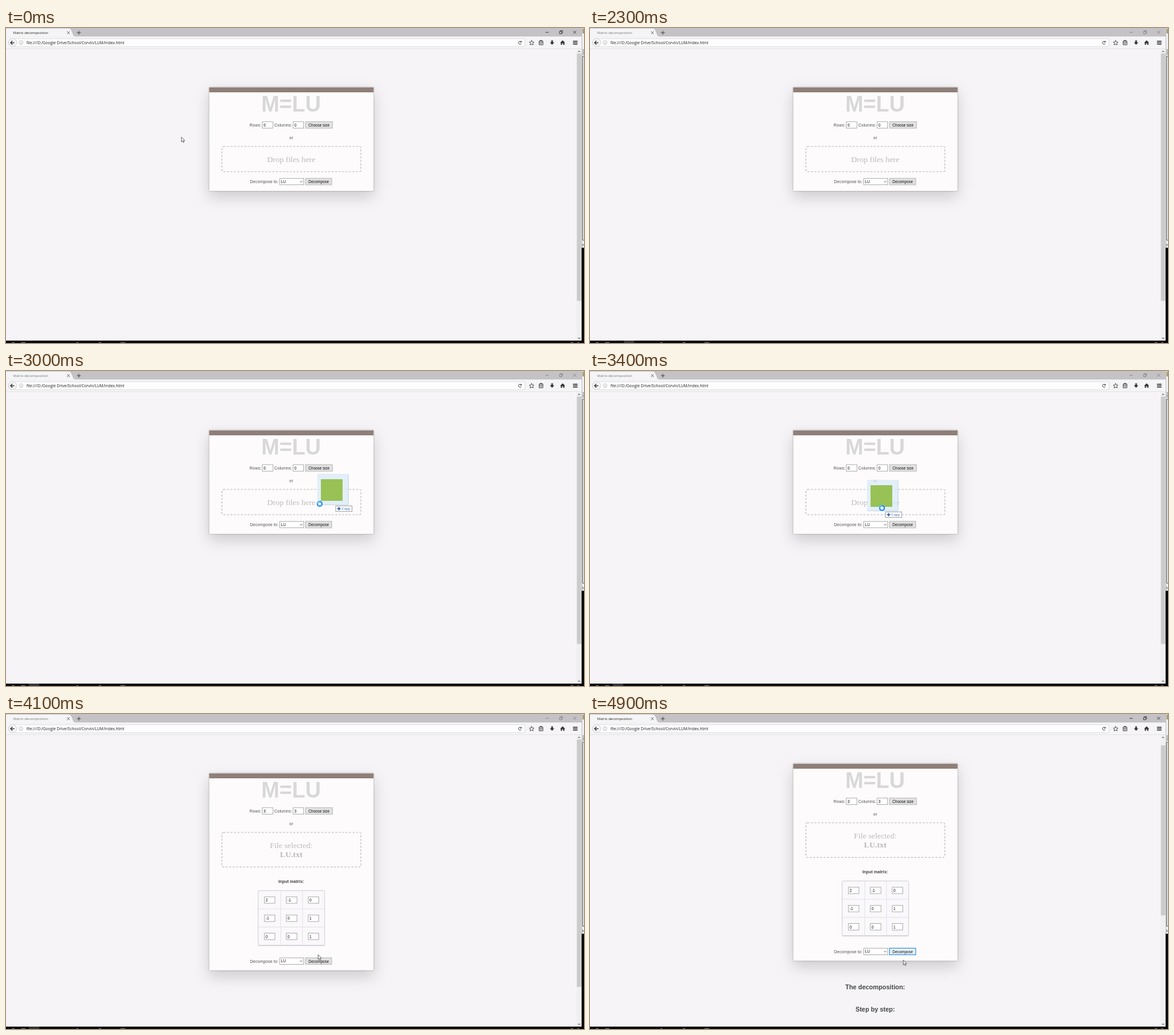
Animation, 960 px wide and 524 px high, one loop 4950 ms. Source, as an HTML page:

```html
<!DOCTYPE html>
<html lang="en">
<head>
<meta charset="utf-8">
<title>Matrix decomposition</title>
<style>
  html, body { margin: 0; width: 100%; height: 100%; overflow: hidden; background: #f6f4f7; }
  svg { display: block; width: 960px; height: 524px; }
  text { font: 7px "Liberation Sans", Arial, sans-serif; fill: #555; white-space: pre; }
  .ui { font: 5.7px "Open Sans", "Noto Sans", sans-serif; fill: #222; }
  .mid { text-anchor: middle; }
  .title { font-size: 36px; font-weight: bold; fill: #d8d8d8; }
  .drop { font: 13.33px "Liberation Serif", "Times New Roman", serif; fill: #bababa; }
  .bold { font-weight: bold; fill: #444; }
  .head { font-size: 10.45px; font-weight: bold; fill: #444; }
  .small { font-size: 6.35px; fill: #111; }
  .box { fill: #fff; stroke: #999; stroke-width: .8; }
  .btn { fill: #e1e1e1; stroke: #b4b4b4; stroke-width: .9; }
  .line { fill: none; stroke: #444; stroke-width: 1; }
  .focus { fill: #e5f1fb; stroke: #0078d7; }
  #sheet { fill: #fefbfc; filter: drop-shadow(0 .5px 1px rgba(0,0,0,.38)) drop-shadow(0 10px 12px rgba(0,0,0,.17)); }
  .idle #tab { fill: #777; }
  .idle #controls { stroke: #8c8b8d; }
</style>
</head>
<body>
<svg id="stage" viewBox="0 0 960 524">
  <defs>
    <clipPath id="view"><rect y="35" width="947.5" height="485"/></clipPath>
  </defs>
  <rect width="960" height="524" fill="#f6f4f7"/>

  <g clip-path="url(#view)">
    <g id="page">
      <rect id="sheet" x="337.5" y="98.5" width="273" height="172.5"/>
      <rect x="337.5" y="98.8" width="273" height="8.2" fill="#8f7f78"/>
      <text class="title mid" x="473.5" y="139">M=LU</text>
      <text x="404.5" y="164">Rows:</text>
      <text x="445.5" y="164">Columns:</text>
      <g id="sizes"></g>
      <rect class="btn" x="497.5" y="155.8" width="44.8" height="11"/>
      <text class="small mid" x="519.8" y="163.8">Choose size</text>
      <text class="mid" x="473.7" y="185">or</text>
      <rect id="zone" x="358.6" y="197" width="230.8" height="42" rx="2.5" fill="none"
            stroke="#b5b5b8" stroke-width="1.1" stroke-dasharray="3.4 2.4"/>
      <text id="prompt" class="drop mid" x="473.7" y="222.5">Drop files here</text>
      <g id="loaded">
        <text class="drop mid" x="473.7" y="222.5">File selected:</text>
        <text class="drop mid" x="473.7" y="238" font-weight="bold" style="font-weight:bold">LU.txt</text>
        <text class="bold mid" x="473.7" y="281.3">Input matrix:</text>
        <rect x="418.8" y="293.8" width="110.4" height="91" rx="1.5" fill="#faf8fb" stroke="#cfcdd1"/>
        <path d="M456.4 294V384.500M492.600 294V384.500M419 324H529M419 354.300H529" class="line" style="stroke:#e4e2e6"/>
        <path d="M419 385.300H529" class="line" style="stroke:#c4c2c6;stroke-width:.7"/>
        <g id="matrix"></g>
      </g>
      <g id="actions">
        <text x="405.3" y="258">Decompose to:</text>
        <rect class="box" x="454.700" y="250.200" width="40" height="10.600"/>
        <text class="small" x="456.800" y="257.900">LU</text>
        <path class="line" d="M488.300 254.500L490.300 256.600L492.300 254.500" style="stroke-width:.8"/>
        <rect id="go" class="btn" x="497.500" y="250" width="43.500" height="11"/>
        <text class="small mid" x="519.300" y="258">Decompose</text>
      </g>
      <g id="result">
        <text class="head mid" x="473.700" y="474">The decomposition:</text>
        <text class="head mid" x="473.700" y="510.700">Step by step:</text>
      </g>
    </g>
  </g>

  <g id="scrollbar">
    <rect x="947.500" y="35" width="8.500" height="485" fill="#f0f0f0"/>
    <rect id="thumb" x="948.200" y="42.500" width="7.500" height="411.500" fill="#cbcbcc"/>
    <path class="line" d="M950 40L951.800 38L953.600 40M950 515L951.800 517L953.600 515"/>
  </g>

  <g id="window">
    <rect width="956" height="14.500" fill="#c4c2c4"/>
    <path d="M0 1H104C111 1 109 14.500 116 14.500H0Z" fill="#f5f4f6"/>
    <rect y="14.300" width="956" height="20" fill="#f5f4f6"/>
    <path d="M0 34.400H956" class="line" style="stroke:#dddbde;stroke-width:.7"/>
    <path d="M14 17.800H862V31H14" fill="#fdfdfd" stroke="#d2d0d3" stroke-width=".7"/>
    <text id="tab" class="ui" x="12" y="9.700">Matrix decomposition</text>
    <path class="line" d="M101.200 5.400L106 10.200M106 5.400L101.200 10.200" style="stroke-width:.8"/>
    <path class="line" d="M117.800 7.800H124.200M121 4.600V11"/>
    <g id="controls" class="line">
      <path d="M896 7.200H901.500M919.300 5.700H923V9.600H919.300ZM920.600 5.500V4.300H924.300V8.300H923M942 4.500L947 9.500M947 4.500L942 9.500"/>
    </g>
    <circle cx="10.800" cy="24.400" r="6.700" fill="#fbfbfb" stroke="#bdbbbe" stroke-width=".8"/>
    <path class="line" d="M14.200 24.400H7.800M10.700 21.200L7.500 24.400L10.700 27.600" style="stroke-width:1.500"/>
    <circle class="line" cx="25" cy="24.400" r="3.200" style="stroke:#aaa;stroke-width:.7"/>
    <path class="line" d="M25 23.800V26.200M25 22.500V23.100" style="stroke:#999;stroke-width:.7"/>
    <text class="ui" x="34" y="26.800" style="font-size:6.550px">file:///D:/Google Drive/School/Corvin/LUM/index.html</text>
    <path class="line" d="M855.800 23A2.500 2.500 0 1 0 855.800 26M856.200 21.600V23.600H854"/>
    <path class="line" d="M873 20.500L874.200 23.100L877 23.400L874.900 25.300L875.500 28.100L873 26.700L870.500 28.100L871.100 25.300L869 23.400L871.800 23.100Z" style="stroke-width:.9"/>
    <path class="line" d="M885.500 21.800H891.800V28H885.500ZM887 21.600V20.600H890.200V21.600M885.500 24H891.800M887.300 26H890"/>
    <path d="M905.700 20.600H908.300V23.800H910.700L907 28L903.300 23.800H905.700Z" fill="#333"/>
    <path d="M924.500 20.500L928.600 24.500H927.500V28H925.500V25.500H923.500V28H921.500V24.500H920.400Z" fill="#333"/>
    <path class="line" d="M941.700 22H949.300M941.700 24.400H949.300M941.700 26.800H949.300" style="stroke:#333;stroke-width:1.400"/>
  </g>

  <g id="edge">
    <rect x="956" width="4" height="366" fill="#efeef0"/>
    <path d="M956.500 0V366" class="line" style="stroke:#b5b4b6;stroke-width:.8"/>
    <rect x="957.500" y="1" width="2.500" height="8" fill="#a89a70"/>
    <path d="M958 36H960M958 41.500H960M958.500 36V45" class="line" style="stroke:#888"/>
    <path d="M960 47H957.800V353H960" class="line" style="stroke:#555"/>
    <text class="ui" x="957" y="362.500">N</text>
    <rect x="956" y="365.500" width="4" height="158.500" fill="#050506"/>
  </g>

  <g id="taskbar">
    <rect y="520" width="960" height="4" fill="#050507"/>
    <rect id="task" y="520" width="17.500" height="4" fill="#34353a"/>
    <path d="M10 523.500H14M25 523.500H32M117 523.500H120M154 523.500H158M190 523.500H198M938 523.500H942M949 523.500H952" class="line" style="stroke:#85858a"/>
  </g>

  <g id="ghost">
    <rect width="52" height="52" fill="#d9ebf8" opacity=".75"/>
    <path d="M51.700 1V51.700H1" class="line" style="stroke:#b9cedd;stroke-width:.8"/>
    <rect x="6" y="9" width="36" height="36" fill="#91bd45" opacity=".9"/>
    <rect x="30.800" y="53.300" width="27" height="9.400" fill="#fff" stroke="#8b8b90" stroke-width=".8"/>
    <path d="M33.200 58H38.800M36 55.200V60.800" class="line" style="stroke:#1c4f9c;stroke-width:1.500"/>
    <text class="ui" x="40.600" y="60.200" style="font-size:6px;fill:#2a5aa6">Copy</text>
  </g>
  <g id="busy">
    <circle r="3.900" fill="#e8f4ff" stroke="#1f8df0" stroke-width="2.200"/>
    <path d="M-3.900 0A3.900 3.900 0 0 1 0 -3.900" fill="none" stroke="#5cb8ff" stroke-width="2"/>
  </g>
  <path id="cursor" d="M.400 .400V8.300L2.200 6.600L3.500 9.500L4.700 9L3.500 6.200H6Z" fill="#fff" stroke="#333" stroke-width=".7"/>
</svg>

<script>
const LOOP = 4950;
const $ = id => document.getElementById(id);

// Rows are [start, x, y]; no x means hidden.
const cursorSteps = [
  [0, 291, 181], [100, 681, 193], [300], [3500, 490, 232],
  [3700, 527, 349], [3900, 515, 374], [4100, 518, 400], [4300, 520, 409]
];
const ghostSteps = [
  [0], [2600, 878, 186], [2700, 792, 182], [2800, 692, 177],
  [2900, 598, 172], [3000, 517, 171], [3100, 459, 178],
  [3200, 460, 181], [3500]
];
const busySteps = [
  [0], [2600, 896, 233], [2700, 800, 229], [2800, 698, 224],
  [2900, 605, 220], [3000, 521, 221], [3100, 484, 226],
  [3200, 485, 228], [3500]
];
const taskSteps = [[0], [100, 56, 0], [2400, 38, 0], [4300]];
const scrollSteps = [[0, 0], [4600, 5], [4700, 11], [4800, 16]];

const at = (steps, t) => steps.findLast(s => s[0] <= t);
const show = (el, on) => el.setAttribute("display", on ? "inline" : "none");
const move = (el, x, y) => el.setAttribute("transform", `translate(${x} ${y})`);

function place(id, steps, t) {
  const [, x, y] = at(steps, t);
  show($(id), x !== undefined);
  if (x !== undefined) move($(id), x, y);
}

const field = (x, y, value) =>
  `<rect class="box" x="${x}" y="${y}" width="17.600" height="10.800"/>` +
  `<text class="small" x="${x + 2}" y="${y + 8}">${value}</text>`;

$("sizes").innerHTML = field(425.7, 155.9, 0) + field(476.9, 155.9, 0);
$("matrix").innerHTML = [2, -1, 0, -1, 0, 1, 0, 0, 1]
  .map((v, i) => field(429.2 + i % 3 * 36.4, 304.1 + Math.floor(i / 3) * 30.2, v))
  .join("");
const sizeTexts = $("sizes").querySelectorAll("text");

function draw(t) {
  const loaded = t >= 3500, solved = t >= 4500;
  const scroll = at(scrollSteps, t)[1];

  $("stage").classList.toggle("idle", t >= 2300 && t < 4400);
  $("go").classList.toggle("focus", t >= 4300);
  show($("loaded"), loaded);
  show($("prompt"), !loaded);
  show($("result"), solved);
  sizeTexts.forEach(el => el.textContent = loaded ? 3 : 0);

  $("sheet").setAttribute("height", loaded ? 328 : 172.5);
  $("zone").setAttribute("height", loaded ? 57.5 : 42);
  move($("actions"), 0, loaded ? 155.6 : 0);
  move($("page"), 0, -scroll);
  $("thumb").setAttribute("y", 42.5 + scroll * .6);
  $("thumb").setAttribute("height", solved ? 283 : 411.5);

  place("task", taskSteps, t);
  place("ghost", ghostSteps, t);
  place("busy", busySteps, t);
  place("cursor", cursorSteps, t);
}

const start = performance.now();
function tick() {
  draw((performance.now() - start) % LOOP);
  requestAnimationFrame(tick);
}
tick();
</script>
</body>
</html>
```
